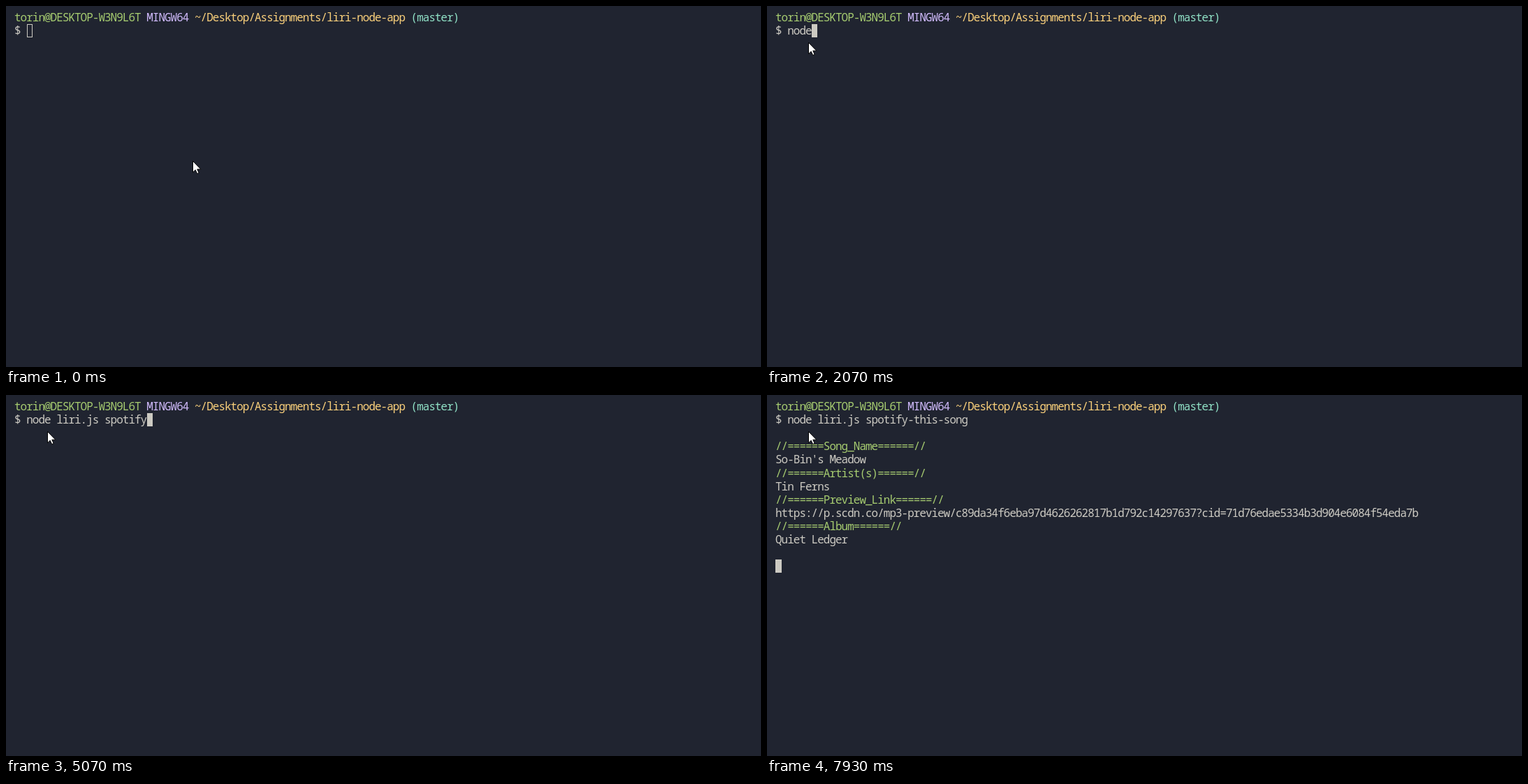
Write an HTML page that moves like this. It is 1081 px wide and 518 px high and loops after 8 s.

```html
<!DOCTYPE html>
<html lang="en">
<head>
<meta charset="utf-8">
<title>Terminal session</title>
<style>
  html, body { margin: 0; width: 100%; height: 100%; overflow: hidden; background: #202430; }
  svg { display: block; }
  text { font: 16px "Noto Sans Mono", "DejaVu Sans Mono", monospace; letter-spacing: -1px; white-space: pre; }
</style>
</head>
<body>
<svg id="stage" width="1081" height="518" viewBox="0 0 1081 518">
  <g id="lines"></g>
  <g id="output"></g>
  <rect id="caret" stroke="#cccac2"/>
  <path id="pointer" d="M.5 .5V16.8L4.2 13.2L6.7 18.6L9.2 17.5L6.8 12.2H11.8Z" fill="#fff" stroke="#000" stroke-width="1"/>
</svg>
<script>
const LOOP = 8000, CELL = 8.6, ROW = 19.1;
const COLORS = { text: '#cccac2', green: '#a6cc70', purple: '#cfbafa', yellow: '#fad07b', cyan: '#90e1c6' };
const COMMAND = 'node liri.js spotify-this-song';
const FOCUS = 930, ENTER = 6670, RESULT = 7930;

// One entry per keystroke; the file extension arrives at once by completion.
const KEYS = [
  1670, 1800, 1870, 2070, 2130, 2270, 2470, 2600, 2670, 3400, 3400, 3400, 3400,
  4270, 4400, 4530, 4600, 4730, 4870, 5070, 5200, 5330, 5470, 5600, 5730,
  5930, 6070, 6200, 6400, 6470
];

const POINTER_START = [267, 222], POINTER_NEAR = [59, 55], POINTER_END = [59, 52];
const POINTER_STEPS = Array.from({ length: 9 }, (_, i) => Math.round((i + 1) * 20 / 3) * 10);

const byId = id => document.getElementById(id);
const lines = byId('lines'), output = byId('output'), caret = byId('caret'), pointer = byId('pointer');

function write(parent, row, col, color, content) {
  const node = document.createElementNS('http://www.w3.org/2000/svg', 'text');
  node.setAttribute('x', 12 + col * CELL);
  node.setAttribute('y', Math.round(22 + row * ROW));
  node.setAttribute('fill', COLORS[color]);
  node.textContent = content;
  parent.appendChild(node);
  return node;
}

write(lines, 0, 0, 'green', 'torin@DESKTOP-W3N9L6T');
write(lines, 0, 22, 'purple', 'MINGW64');
write(lines, 0, 30, 'yellow', '~/Desktop/Assignments/liri-node-app');
write(lines, 0, 66, 'cyan', '(master)');
write(lines, 1, 0, 'text', '$');
const typed = write(lines, 1, 2, 'text', '');

[
  ['Song_Name', "So-Bin's Meadow"],
  ['Artist(s)', 'Tin Ferns'],
  ['Preview_Link', 'https://p.scdn.co/mp3-preview/c89da34f6eba97d4626262817b1d792c14297637?cid=71d76edae5334b3d904e6084f54eda7b'],
  ['Album', 'Quiet Ledger']
].forEach(([label, value], i) => {
  write(output, 3 + i * 2, 0, 'green', `//======${label}======//`);
  write(output, 4 + i * 2, 0, 'text', value);
});

const countPast = (times, t) => times.filter(time => time <= t).length;

function placeCaret(row, col, filled) {
  const left = Math.round(12.4 + col * CELL), right = Math.round(12.2 + (col + 1) * CELL);
  const top = Math.round(6.9 + row * ROW);
  caret.setAttribute('x', left + 0.5);
  caret.setAttribute('y', top + 0.5);
  caret.setAttribute('width', right - left - 1);
  caret.setAttribute('height', 18);
  caret.setAttribute('fill', filled ? COLORS.text : 'none');
}

function pointerAt(t) {
  if (t >= 800) return POINTER_END;
  const p = countPast(POINTER_STEPS, t) / POINTER_STEPS.length;
  const eased = p * p * (3 - 2 * p);
  return POINTER_START.map((from, i) => Math.round(from + (POINTER_NEAR[i] - from) * eased));
}

function render(t) {
  const count = countPast(KEYS, t);
  typed.textContent = COMMAND.slice(0, count);
  output.setAttribute('visibility', t >= RESULT ? 'visible' : 'hidden');
  if (t >= RESULT) placeCaret(12, 0, true);
  else if (t >= ENTER) placeCaret(2, 0, true);
  else placeCaret(1, 2 + count, t >= FOCUS);
  pointer.setAttribute('transform', `translate(${pointerAt(t)})`);
}

const start = performance.now();
function tick() {
  render((performance.now() - start) % LOOP);
  requestAnimationFrame(tick);
}
tick();
</script>
</body>
</html>
```
